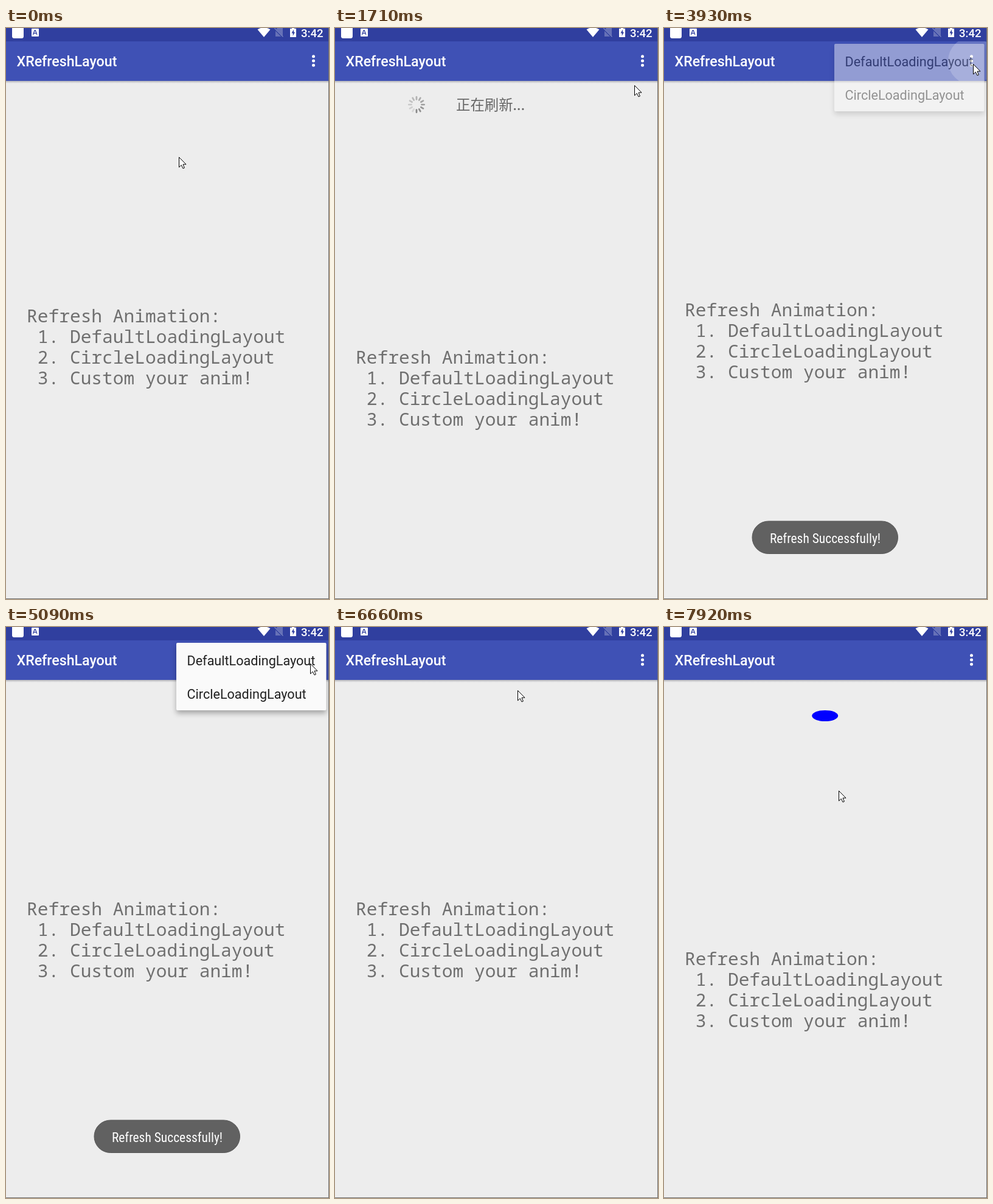
Animation, 531 px wide and 939 px high, one loop 8 s. Source, as an HTML page:

```html
<!DOCTYPE html>
<html lang="en">
<head>
<meta charset="utf-8">
<title>XRefreshLayout</title>
<style>
  html, body { margin: 0; width: 100%; height: 100%; overflow: hidden; background: #ededed; }
  svg { display: block; }
  text { white-space: pre; font-family: Roboto, sans-serif; }
  #body text { font: 29.55px "Noto Sans Mono", monospace; fill: #6f6f6f; }
  #title { font-size: 23.2px; font-weight: 500; fill: #fff; }
  #clock { font-size: 18.6px; font-weight: 500; fill: #fff; }
  #label { font: 500 23.4px Roboto, "Noto Sans CJK SC", "Noto Sans CJK", sans-serif; fill: #666; }
  #menu text { font-size: 21.6px; fill: #212121; }
  #panel { filter: drop-shadow(0 5px 4px rgba(0, 0, 0, .3)); }
  #toast text { font: condensed 21.5px "Roboto Condensed", Roboto, sans-serif; fill: #fff; text-anchor: middle; }
</style>
</head>
<body>
<svg width="531" height="939" viewBox="0 0 531 939">
  <defs>
    <clipPath id="contentClip"><rect y="87" width="531" height="852"/></clipPath>
    <clipPath id="barClip"><rect y="22" width="531" height="65"/></clipPath>
    <clipPath id="itemClip"><rect x="280" y="82" width="246" height="55"/></clipPath>
    <linearGradient id="barShadow" x2="0" y2="1">
      <stop stop-color="#b3b3b8"/><stop offset="1" stop-color="#ededed"/>
    </linearGradient>
  </defs>
  <rect width="531" height="939" fill="#ededed"/>

  <g clip-path="url(#contentClip)">
    <g id="body">
      <text x="34" y="474">Refresh Animation:</text>
      <text x="34" y="508"> 1. DefaultLoadingLayout</text>
      <text x="34" y="542"> 2. CircleLoadingLayout</text>
      <text x="34" y="576"> 3. Custom your anim!</text>
    </g>
    <g id="header">
      <g id="spinner" stroke="#777" stroke-width="2.7" stroke-linecap="round"></g>
      <text id="label" x="199" y="135">正在刷新...</text>
    </g>
    <path id="pie" fill="#00f"/>
    <ellipse id="disc" cx="264.7" rx="21.5" fill="#00f"/>
  </g>

  <rect y="87" width="531" height="4" fill="url(#barShadow)"/>
  <rect y="22" width="531" height="65" fill="#3f51b5"/>
  <rect width="531" height="22" fill="#303f9f"/>
  <text id="title" x="17.5" y="63">XRefreshLayout</text>
  <g clip-path="url(#barClip)"><circle id="touch" cx="506" cy="54" fill="#fff"/></g>
  <g fill="#fff">
    <circle cx="505.5" cy="46.8" r="2.5"/><circle cx="505.5" cy="54" r="2.5"/><circle cx="505.5" cy="61.2" r="2.5"/>
    <rect x="10" y="-3" width="19" height="20" rx="3.5"/>
    <rect x="42" y="1" width="12" height="13" rx="1"/>
    <path d="M413.5 2.5Q424-4 434.5 2.5L424 15Z"/>
    <path d="M467 1h3v-2h4v2h3v14h-10z"/>
  </g>
  <path d="M44.5 11l2.6-7h1.2l2.6 7M45.8 8.6h4" fill="none" stroke="#303f9f" stroke-width="1.3"/>
  <path d="M473 2.5l-3.6 6h2.3v4.5l3.3-6.3h-2z" fill="#303f9f"/>
  <path d="M446 0h9v14h-12v-10z" fill="#6671b7"/>
  <path d="M441.5 1.5l14 14" stroke="#303f9f" stroke-width="2.5"/>
  <path d="M441.5 .5l14 14" stroke="#7a84c2" stroke-width="1.2"/>
  <text id="clock" x="485" y="14.5">3:42</text>

  <g id="menu">
    <rect id="panel" x="280" y="26" width="246.5" height="111" rx="2" fill="#fafafa"/>
    <g id="press" clip-path="url(#itemClip)">
      <rect x="280" y="82" width="246.5" height="55" fill="#e8e8e8"/>
      <circle id="ring" cx="385" cy="103" fill="#d9d9d9"/>
    </g>
    <text x="297.5" y="62.5">DefaultLoadingLayout</text>
    <text x="297.5" y="118">CircleLoadingLayout</text>
  </g>

  <g id="toast">
    <rect x="145" y="811" width="239.5" height="53.5" rx="26.7" fill="#616161" stroke="#575757"/>
    <text x="265" y="846.5">Refresh Successfully!</text>
  </g>

  <path d="M530.5 0V939M0 938.5H531" stroke="#707070"/>
  <path id="cursor" d="M.5.5V17L4.3 13.4 7 19l2.4-1L7 12.2h5z" fill="#fff" stroke="#000"/>
</svg>
<script>
const $ = id => document.getElementById(id);
const LOOP = 8000;
const STEP = 140;        // the picture holds still this long
const HEADER = 78;       // height of the refresh header
const PIE_START = 47.8;  // pull at which the pie begins to fill

// All moments below are counted in steps.
const ramp = (t, from, to) => Math.min(1, Math.max(0, (t - from) / (to - from)));
const smooth = (t, from, to) => {
  const x = ramp(t, from, to);
  return x * x * (3 - 2 * x);
};
const fade = (t, inFrom, inTo, outFrom, outTo) => ramp(t, inFrom, inTo) * (1 - ramp(t, outFrom, outTo));

// Pointer glides between the two drags
const glides = [
  { from: 4, to: 8, x: 452, y: 137 },
  { from: 8, to: 12, x: 492, y: 94 },
  { from: 12, to: 19, x: 508, y: 59 },
  { from: 32, to: 34, x: 500, y: 60 },
  { from: 36, to: 42, x: 384, y: 100 },
  { from: 44, to: 48, x: 285, y: 105 },
  { from: 51, to: 56, x: 287, y: 105 }
];

function set(id, attributes) {
  for (const name in attributes) $(id).setAttribute(name, attributes[name]);
}

const move = (x, y) => `translate(${Math.round(x)} ${Math.round(y)})`;

const spokes = Array.from({ length: 12 }, (_, i) => {
  const spoke = document.createElementNS('http://www.w3.org/2000/svg', 'path');
  spoke.setAttribute('d', 'M0-8.5V-12.7');
  spoke.setAttribute('transform', `translate(134 126) rotate(${i * 30})`);
  return $('spinner').appendChild(spoke);
});

function drawSpinner(t) {
  spokes.forEach((spoke, i) => {
    const age = (2 * t + 18 - i) % 12;
    spoke.setAttribute('opacity', .85 - age * .06);
  });
}

function drawCircle(t, pull) {
  const full = t >= 52;
  const part = ramp(pull, PIE_START, HEADER);
  const angle = part * 2 * Math.PI;
  const cx = 262, cy = pull + 66, r = 23.5;
  const tip = `${cx + r * Math.sin(angle)} ${cy - r * Math.cos(angle)}`;
  set('pie', {
    d: `M${cx} ${cy}V${cy - r}A${r} ${r} 0 ${angle > Math.PI ? 1 : 0} 1 ${tip}Z`,
    opacity: t > 48 && !full && part ? .1 + .9 * part : 0
  });
  const flip = (t - 52) * Math.PI / 6.26;
  set('disc', { cy: pull + 64, ry: 21.5 * Math.abs(Math.cos(flip)), opacity: full ? 1 : 0 });
}

function draw(time) {
  const t = Math.floor(time / STEP);

  const firstDrag = 88 * smooth(t, 0, 4);
  const secondDrag = 118 * smooth(t, 48, 54.2) - 36 * smooth(t, 54, 56);
  const pull = Math.round(10 + firstDrag - 20 * smooth(t, 4, 7) - HEADER * smooth(t, 22, 25) + secondDrag);

  set('body', { transform: move(0, pull) });
  set('header', { transform: move(0, pull - HEADER), opacity: t < 26 ? 1 : 0 });
  drawSpinner(t);
  drawCircle(t, pull);

  set('touch', { r: 39 * ramp(t, 25, 28), opacity: .2 * fade(t, 25, 26, 28, 31) });
  set('menu', { opacity: fade(t, 26, 30.5, 43, 46) });
  set('press', { opacity: ramp(t, 40, 42) });
  set('ring', { r: 10.5 * Math.max(0, t - 40) });
  set('toast', { opacity: fade(t, 22, 25, 38, 41) });

  // The content follows the pointer at half its speed.
  let x = 284, y = 212 + 2 * firstDrag;
  for (const glide of glides) {
    const part = smooth(t, glide.from, glide.to);
    x += (glide.x - x) * part;
    y += (glide.y - y) * part;
  }
  set('cursor', { transform: move(x, y + 2 * secondDrag) });
}

// Without a condensed face, use the size that keeps the message inside its pill
const message = document.querySelector('#toast text');
if (message.getComputedTextLength() > 195) message.style.fontSize = '19px';

let start;
function tick(now) {
  start ??= now;
  draw((now - start) % LOOP);
  requestAnimationFrame(tick);
}
draw(0);
requestAnimationFrame(tick);
</script>
</body>
</html>
```
